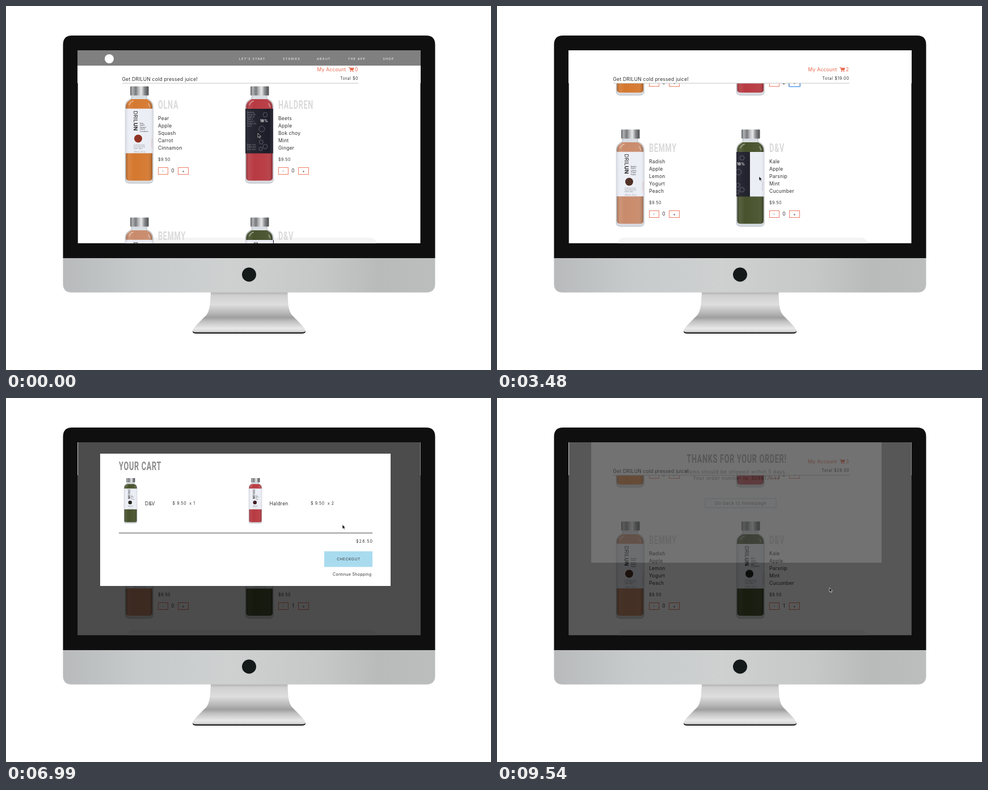
These frames come from a looping animation (855x641 px, 9570 ms). An HTML page:

```html
<!DOCTYPE html>
<html lang="en">
<head>
<meta charset="utf-8">
<title>Juice shop</title>
<style>
html, body { margin: 0; width: 100%; height: 100%; overflow: hidden; background: #fff; }
svg { display: block; }
text { font-family: Inter, "Liberation Sans", sans-serif; fill: #333; white-space: pre; }
.body { font-size: 8.5px; letter-spacing: .25px; }
.small { font-size: 7px; letter-spacing: .6px; }
.link { fill: #e8674c; }
.display { font: 700 19.4px Roboto, "Liberation Sans", sans-serif; letter-spacing: 1px; }
.nav { font-size: 5.3px; letter-spacing: 1.25px; fill: #fff; }
.brand { font-size: 9.4px; letter-spacing: .1px; fill: #222; }
.print { font-size: 2.9px; letter-spacing: .1px; }
.ink { fill: #a9abb5; }
.percent { font-size: 6.6px; font-weight: 700; fill: #fff; }
.sum { font-size: 7px; letter-spacing: 1.1px; }
.pay { font-size: 6.3px; letter-spacing: .8px; }
.more { font-size: 7px; letter-spacing: .3px; }
.note { font-size: 8.5px; letter-spacing: .6px; }
.back { font-size: 8px; letter-spacing: .4px; }
.mid { text-anchor: middle; }
.end { text-anchor: end; }
.box { fill: #fff; stroke: #ee7f68; }
.ring { fill: none; stroke: #7fb8f2; stroke-width: 2; }
</style>
</head>
<body>
<script>
const T = 9570;
const BRAND = ['DRIL', 'UN'];
const css = [];

// Turns [ms, declarations, easing] steps into a looping keyframe rule.
function track(id, steps) {
  const frames = steps.map(([ms, decl, ease = 'linear']) =>
    `${(ms / T * 100).toFixed(3)}%{${decl};animation-timing-function:${ease}}`);
  css.push(`@keyframes ${id}{${frames.join('')}}#${id}{animation:${id} ${T}ms infinite}`);
}

const move = (x, y) => `transform:translate(${x}px,${y}px)`;
const fade = o => `opacity:${o}`;
const pose = (o, y) => `${fade(o)};${move(0, y)}`;

let shownCount = 0;
// Shows markup only from one time to another, with hard changes.
function during(from, to, markup) {
  const id = 'show' + shownCount++;
  const steps = [[0, fade(from ? 0 : 1), 'step-end']];
  if (from) steps.push([from, fade(1), 'step-end']);
  if (to < T) steps.push([to, fade(0), 'step-end']);
  steps.push([T, fade(to < T ? 0 : 1)]);
  track(id, steps);
  return `<g id="${id}">${markup}</g>`;
}

const text = (x, y, str, cls = 'body') => `<text x="${x}" y="${y}" class="${cls}">${str}</text>`;
const rect = (x, y, w, h, attrs = '') => `<rect x="${x}" y="${y}" width="${w}" height="${h}" ${attrs}/>`;
const at = (x, y, markup, extra = '') => `<g transform="translate(${x} ${y}) ${extra}">${markup}</g>`;
const title = (x, y, str, fill, cls = '') =>
  at(x, y, `<text class="display ${cls}" style="fill:${fill}">${str}</text>`, 'scale(.66 1)');
const rows = (list, x, y, step, cls) => list.map((s, i) => text(x, y + i * step, s, cls)).join('');

const gradient = (id, vertical, stops) =>
  `<linearGradient id="${id}" x2="${vertical ? 0 : 1}" y2="${vertical ? 1 : 0}">` +
  stops.map(([o, c, a = 1]) => `<stop offset="${o}" stop-color="${c}" stop-opacity="${a}"/>`).join('') +
  '</linearGradient>';

const CLICKS = { first: 1150, second: 1550, third: 4250, cart: 6150 };

const JUICES = [
  { name: 'OLNA', color: '#d5782f', mark: '#8c2c1c', parts: ['Pear', 'Apple', 'Squash', 'Carrot', 'Cinnamon'] },
  { name: 'HALDREN', color: '#b83a42', mark: '#3a161a', parts: ['Beets', 'Apple', 'Bok choy', 'Mint', 'Ginger'], strip: 'spinRed' },
  { name: 'BEMMY', color: '#c98b6b', mark: '#4b2c20', parts: ['Radish', 'Apple', 'Lemon', 'Yogurt', 'Peach'] },
  { name: 'D&amp;V', color: '#48522d', mark: '#20221a', parts: ['Kale', 'Apple', 'Parsnip', 'Mint', 'Cucumber'], strip: 'spinGreen' },
];

function frontLabel({ mark, parts }) {
  return rect(0, 39, 49.5, 79, 'fill="#eceef6"') +
    at(14.5, 43, `<text class="brand">${BRAND[0]}<tspan font-weight="700">${BRAND[1]}</tspan></text>`, 'rotate(90)') +
    rows(parts, 26, 66, 3.6, 'print') +
    `<circle cx="23" cy="92" r="7" fill="${mark}"/>` +
    `<g opacity=".55">${rows(['Cold pressed', 'fruit and roots', 'made daily'], 15, 104, 3, 'print')}${text(15, 116, '350 ml / 12 oz', 'print')}</g>` +
    at(45.5, 92, '<text class="print" style="fill:#e8a08c">Fresh juice</text>', 'rotate(90)');
}

function backLabel() {
  const ring = (x, y, r) => `<circle cx="${x}" cy="${y}" r="${r}" fill="none" stroke="#8b8d98" stroke-width=".6"/>`;
  return rect(49, 39, 49.5, 79, 'fill="#1c1d28"') +
    rows(['Nutrition', 'Energy 95', 'Sugar 14', 'Fiber 2', 'Protein 1', 'Sodium 20', 'Iron 4'], 52, 47, 4, 'print ink') +
    text(75, 63, '18%', 'percent') +
    ring(84, 50, 4) + ring(78, 75, 5) + ring(77, 98, 3.5) + ring(84, 106, 4) + ring(76, 110, 3) +
    rows(['Keep cold', 'Shake well', 'Enjoy soon'], 52, 104, 4, 'print ink');
}

const sideLabel = rect(98, 39, 25, 79, 'fill="#eceef6"') +
  at(118.5, 92, '<text class="print" style="fill:#b9a3b4">Fresh juice</text>', 'rotate(90)');

const GLASS = 'M11.5 15V20C10.5 24 .3 23 .3 37V164Q.3 170.5 8 170.5H41.5Q49.2 170.5 49.2 164V37C49.2 23 39 24 38 20V15Z';
const LIQUID = 'M11 22.5C8 25.5 1.5 26 1.5 38V161Q1.5 166 8 166H41.5Q48 166 48 161V38C48 26 41.5 25.5 38.5 22.5Z';

function bottle(juice, turning) {
  const front = frontLabel(juice);
  const strip = turning && juice.strip
    ? `<g id="${juice.strip}">${front}${backLabel()}${sideLabel}${at(122, 0, front)}</g>` : front;
  return `<path d="${GLASS}" fill="#d9dee4" stroke="#979ca2" stroke-width=".7"/>
    <path d="${LIQUID}" fill="${juice.color}"/>
    <path d="${LIQUID}" fill="url(#round)"/>
    <path d="M7 33Q9 27 15 25.5M41 30L44 37" stroke="#fff" stroke-width="1.6" opacity=".45" fill="none"/>
    ${rect(9, 0, 32.5, 16, 'rx="1" fill="url(#metal)"')}
    <g clip-path="url(#label)">${strip}${rect(0, 39, 49.5, 79, 'fill="url(#curve)"')}</g>`;
}

function counter(i) {
  const n = s => text(294, 293, s, 'body mid');
  const ring = rect(302.5, 284, 20, 13, 'rx="1.5" class="ring"');
  if (i === 1) {
    return during(0, CLICKS.first, n(0)) + during(CLICKS.first, CLICKS.second, n(1)) +
      during(CLICKS.second, T, n(2)) + during(CLICKS.first, CLICKS.third, ring);
  }
  if (i === 3) {
    return during(0, CLICKS.third, n(0)) + during(CLICKS.third, T, n(1)) +
      during(CLICKS.third, CLICKS.cart, ring);
  }
  return n(0);
}

function product(juice, i) {
  return at(i % 2 * 212, Math.floor(i / 2) * 231,
    at(210, 141.5, bottle(juice, true)) +
    title(268, 180.5, juice.name, '#d9d9d9') +
    rows(juice.parts, 268, 201, 13) +
    text(268, 272.5, '$9.50', 'small') +
    rect(268.5, 284.5, 17, 12, 'class="box"') + text(277, 292.5, '-', 'small mid') +
    rect(303.5, 284.5, 18, 12, 'class="box"') + text(312.8, 292.7, '+', 'small mid') +
    counter(i));
}

function header() {
  const totals = ['$0', '$9.50', '$19.00', '$28.50'];
  const times = [0, CLICKS.first, CLICKS.second, CLICKS.third, T];
  return rect(126, 77, 606, 59, 'fill="#fff"') + rect(205, 135.5, 416, 1, 'fill="#c4c4c4"') +
    text(204.5, 132, `Get ${BRAND.join('')} cold pressed juice!`) +
    text(548.5, 114.5, 'My Account', 'body link') +
    '<path d="M604 108.3H605.8L607 113H612L613.2 109.2H606.2Z" fill="#e8674c" stroke="#e8674c" stroke-width=".8"/>' +
    '<circle cx="607.5" cy="115" r="1" fill="#e8674c"/><circle cx="611.5" cy="115" r="1" fill="#e8674c"/>' +
    totals.map((sum, i) => during(times[i], times[i + 1],
      text(615, 114.5, i, 'body link') + text(621, 130, 'Total ' + sum, 'small end'))).join('');
}

function navBar() {
  const items = [[411, 'LET\'S START'], [488, 'STORIES'], [548, 'ABOUT'], [603, 'THE APP'], [664.5, 'SHOP']];
  return `<g id="nav">${rect(126, 77, 606, 28, 'fill="#808080"')}<circle cx="182" cy="93" r="8" fill="#fff"/>` +
    items.map(([x, s]) => text(x, 95.3, s, 'nav')).join('') + '</g>';
}

function cartItem(x, nameX, priceX, juice, name, n) {
  return at(x, 141, bottle(juice, false), 'scale(.468)') +
    text(nameX, 188.5, name) + text(priceX, 188, `$ 9.50  x ${n}`, 'small');
}

function modal() {
  const cart = title(199, 127, 'YOUR CART', '#8a8a8a') +
    cartItem(208, 245, 293.5, JUICES[3], 'D&amp;V', 1) +
    cartItem(428, 464.5, 537, JUICES[1], 'Haldren', 2) +
    rect(199, 237.3, 447, 1, 'fill="#444"') +
    text(647, 254.5, '$28.50', 'sum end') +
    rect(561, 270, 85, 27.5, 'id="pay"') +
    text(604, 286.2, 'CHECKOUT', 'pay mid') +
    text(576, 312.5, 'Continue Shopping', 'more');
  const thanks = title(422.5, 155, 'THANKS FOR YOUR ORDER!', '#555', 'mid') +
    text(422, 173.5, 'Items should be shipped within 5 days.', 'note mid') +
    text(422, 184.5, 'Your order number is: 308612033', 'note mid') +
    rect(367, 218, 125, 16, 'fill="none" stroke="#7da9c9"') +
    text(429.5, 228.5, 'Go back to homepage', 'back mid');
  return `<g id="modal">${rect(166, 98, 512, 233, 'fill="#fff"')}<g id="cart">${cart}</g><g id="thanks">${thanks}</g></g>`;
}

function monitor() {
  return `<path d="M361 504H496.5C497 525 498 537 504 544C510 551 524 563 528 571Q529 576 523 576.5H334Q328 576 329 571C333 563 347 551 353.5 544C359 537 360 525 361 504Z" fill="url(#stand)"/>
    <path d="M329 572Q329 574 335 574.5H522Q528 574 528 572Q529 577 521 577H336Q328 577 329 572Z" fill="#2a2a2a"/>
    <path d="M100.5 443.5H756.5V489Q756.5 504.5 741 504.5H116Q100.5 504.5 100.5 489Z" fill="url(#chin)"/>
    <path d="M100.5 444V68Q100.5 52 116.5 52H740.5Q756.5 52 756.5 68V444Z" fill="#0f0f0f"/>
    <circle cx="428.5" cy="473" r="12.5" fill="#141a1a"/>`;
}

track('scroll', [[0, move(0, 0)], [2000, move(0, 0), 'cubic-bezier(.3,.2,.7,.8)'],
  [2400, move(0, -105), 'ease-out'], [2850, move(0, -155)], [T, move(0, -155)]]);
track('nav', [[0, pose(1, 0)], [2000, pose(1, 0)], [2480, pose(0, -28)], [T, pose(0, -28)]]);
track('spinRed', [[0, move(-49, 0)], [575, move(-122, 0)], [T, move(-122, 0)]]);
track('spinGreen', [[0, move(0, 0)], [2900, move(0, 0)], [3480, move(-74, 0)],
  [3860, move(-122, 0)], [T, move(-122, 0)]]);
track('dim', [[0, fade(0)], [6230, fade(0), 'ease-out'], [6530, fade(.7)], [9480, fade(.7)], [T, fade(.64)]]);
track('modal', [[0, pose(0, -50)], [6230, pose(0, -50), 'ease-out'], [6530, pose(1, 0)],
  [9340, pose(1, 0), 'ease-out'], [T, pose(.14, -42)]]);
track('cart', [[0, fade(1)], [7620, fade(1), 'ease-in-out'], [8020, fade(0)], [T, fade(0)]]);
track('thanks', [[0, fade(0)], [8020, fade(0), 'ease-in-out'], [8420, fade(1)], [T, fade(1)]]);
track('pay', [[0, 'fill:#a9dbef'], [7150, 'fill:#a9dbef'], [7300, 'fill:#f7b42c'], [T, 'fill:#f7b42c']]);

const path = [[0, 444, 224], [250, 446, 226], [950, 524, 290], [1900, 524, 290], [2150, 524, 317],
  [2700, 524, 317], [3150, 470, 305], [3480, 462, 300], [3700, 466, 305], [4100, 522, 366], [4700, 522, 366],
  [5130, 581, 161], [5500, 607, 113], [6700, 607, 113], [7200, 585, 285], [8700, 585, 285],
  [9150, 586, 334], [T, 586, 334]];
track('cursor', path.map(([ms, x, y]) => [ms, move(x, y), 'ease-in-out']));

const defs = gradient('metal', false, [[0, '#5f6163'], [.12, '#b0b2b5'], [.3, '#77797c'], [.45, '#b9babc'], [.6, '#e6e7e8'], [.78, '#86888b'], [1, '#4c4e51']]) +
  gradient('round', false, [[0, '#000', .25], [.12, '#fff', .08], [.3, '#fff', 0], [.8, '#fff', .04], [1, '#000', .22]]) +
  gradient('curve', false, [[0, '#556', .16], [.15, '#fff', .05], [.85, '#fff', 0], [1, '#556', .14]]) +
  gradient('chin', false, [[0, '#b8babb'], [.2, '#c6caca'], [.45, '#cfd1d1'], [.7, '#c6c8c8'], [.85, '#b9bbbb'], [1, '#bcbebe']]) +
  gradient('stand', true, [[0, '#b0b0b0'], [.08, '#d0d0d0'], [.3, '#dedede'], [.5, '#b8b8b8'], [.62, '#9f9f9f'], [.7, '#bebebe'], [.88, '#e8e8e8'], [1, '#cccccc']]) +
  `<clipPath id="screen">${rect(126.7, 78, 603.8, 339.8)}</clipPath>` +
  `<clipPath id="label">${rect(0, 39, 49.5, 79)}</clipPath>`;

const svg = `<svg width="855" height="641" viewBox="0 0 855 641"><defs>${defs}</defs>
  ${monitor()}
  <g clip-path="url(#screen)">
    ${rect(126, 77, 606, 342, 'fill="#fff"')}
    ${rect(213, 408, 440, 30, 'rx="11" fill="#f4f4f4"')}
    <g id="scroll">${JUICES.map(product).join('')}</g>
    ${header()}${navBar()}
    ${rect(126, 77, 606, 342, 'id="dim"')}
    ${modal()}
    <path id="cursor" d="M0 0V7.6L1.8 6.1L3 8.7L4.3 8.1L3.1 5.6H5.4Z" fill="#111" stroke="#fff" stroke-width=".6"/>
  </g></svg>`;

document.head.insertAdjacentHTML('beforeend', `<style>${css.join('\n')}</style>`);
document.body.insertAdjacentHTML('beforeend', svg);
</script>
</body>
</html>
```
